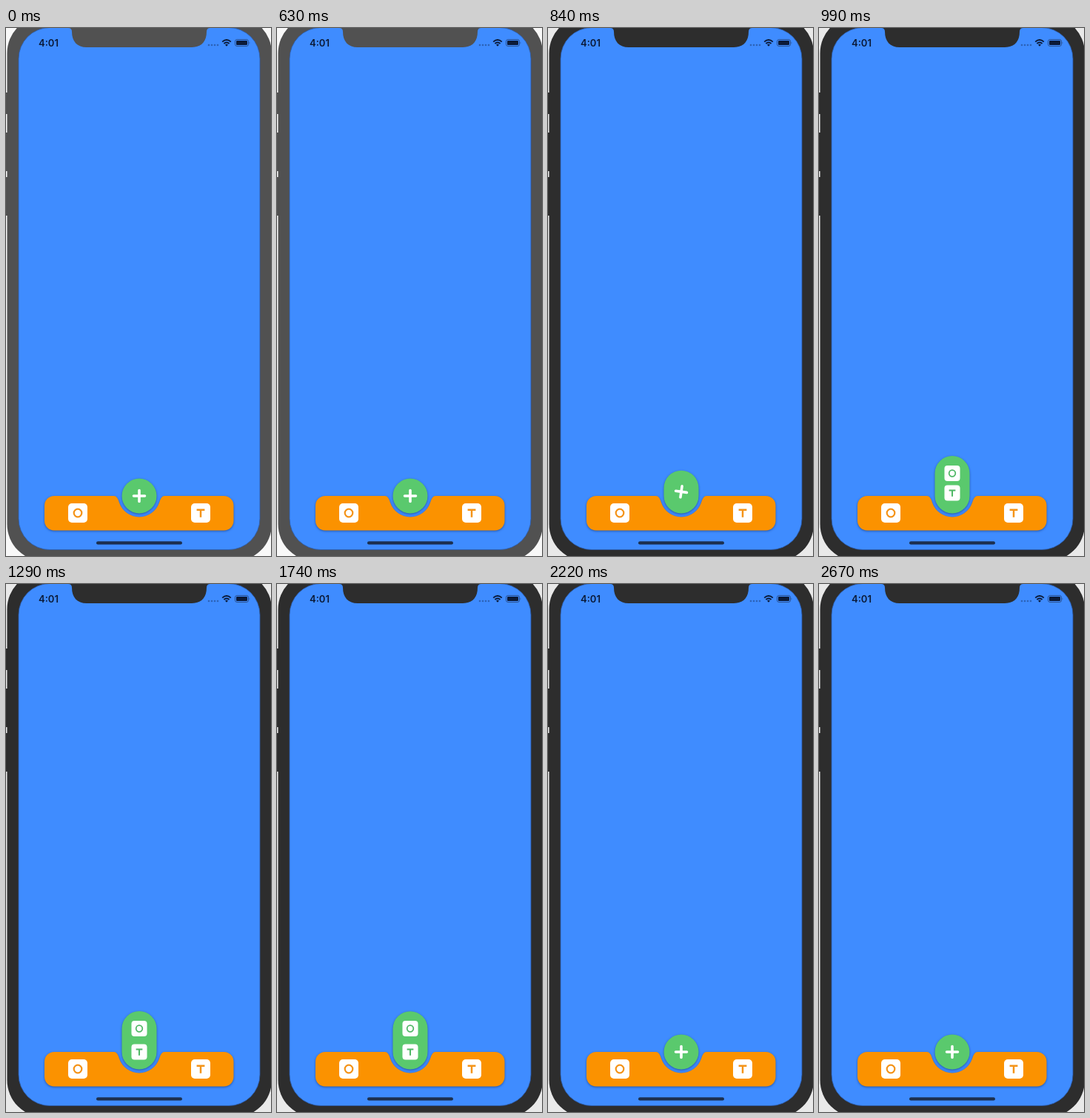
Write an HTML page that moves like this. It is 358 px wide and 712 px high and loops after 2700 ms.

```html
<!DOCTYPE html>
<html lang="en">
<head>
<meta charset="utf-8">
<title>Expanding tab bar button</title>
<style>
  html, body { margin: 0; height: 100%; overflow: hidden; }
  svg { display: block; width: 358px; height: 712px; }
  .shadow { filter: drop-shadow(0 1px 1.5px rgba(10, 30, 80, .5)); }
  text { font: 600 13px Inter, Roboto, sans-serif; }
</style>
</head>
<body>
<svg viewBox="0 0 358 712">
  <defs>
    <g id="ring">
      <rect x="-13" y="-13" width="26" height="26" rx="5" fill="#fff"/>
      <circle r="5.3" fill="none" stroke="currentColor" stroke-width="2.2"/>
    </g>
    <g id="tee">
      <rect x="-13" y="-13" width="26" height="26" rx="5" fill="#fff"/>
      <path d="M-5.4-4.2H5.4M0-4.2V5.8" fill="none" stroke="currentColor" stroke-width="2.5"/>
    </g>
  </defs>

  <rect id="desk" width="358" height="712"/>
  <g id="body">
    <path d="M0 87h3v29H0zM0 141h3v52H0zM0 201h3v52H0z"/>
    <rect x="1.5" y="-16" width="357.5" height="735" rx="50"/>
  </g>
  <rect x="17" y="-.5" width="326" height="704" rx="42" fill="#3f8cff" stroke="#2b5cae" stroke-width=".8"/>
  <path id="notch" d="M84-2V0Q89 0 89 5C89 18 96 26 109 26H251C264 26 271 18 271 5Q271 0 276 0V-2Z"/>

  <g fill="#0b1a38">
    <text x="44" y="24.6">4:01</text>
    <g fill="#2c63b8">
      <circle cx="274" cy="23" r="1.3"/><circle cx="278" cy="23" r="1.3"/>
      <circle cx="282" cy="23" r="1.3"/><circle cx="286" cy="23" r="1.3"/>
    </g>
    <g fill="none" stroke="#0b1a38" stroke-width="1.9">
      <path d="M292.2 18.6Q298 13.4 303.8 18.6M294.4 21Q298 17.8 301.6 21"/>
    </g>
    <path d="M296 22.6Q298 20.9 300 22.6L298 24.8Z"/>
    <rect x="309.5" y="15.5" width="18" height="9" rx="2.6" fill="none" stroke="#2b5191"/>
    <rect x="311" y="17" width="15" height="6" rx="1.3"/>
    <path d="M328.6 18.3q1.5 1.7 0 3.4z" fill="#2b5191"/>
  </g>

  <path class="shadow" fill="#fb9200" d="M65 631H146Q150.500 631 153 640A28.500 28.500 0 0 0 207 640Q209.500 631 214 631H294.500A13 13 0 0 1 307.500 644V664.500A13 13 0 0 1 294.500 677.500H65A13 13 0 0 1 52 664.500V644A13 13 0 0 1 65 631Z"/>
  <g color="#f49318">
    <use href="#ring" x="97" y="654"/>
    <use href="#tee" x="263" y="654"/>
  </g>

  <rect id="pill" class="shadow" x="156.500" width="47" rx="23.500" fill="#5ac96d"/>
  <g color="#4fb865">
    <use id="upper" href="#ring"/>
    <use id="lower" href="#tee"/>
  </g>
  <path id="plus" d="M-7.500 0H7.500M0-7.500V7.500" stroke-width="3.600" stroke-linecap="round"/>
  <rect x="122" y="692.300" width="116" height="4.200" rx="2.100" fill="#1c2f4e"/>
</svg>

<script>
const LOOP = 2700, MOVE = 300, PRESS = 650, OPEN = 723, CLOSE = 1727, LAG = 36;
const el = id => document.getElementById(id);
const set = (id, attrs) => {
  for (const name in attrs) el(id).setAttribute(name, attrs[name]);
};
const clamp = x => Math.min(1, Math.max(0, x));
const ease = x => (x = clamp(x), x * x * (3 - 2 * x));
const openness = t => ease((t - OPEN) / MOVE) - ease((t - CLOSE) / MOVE);

function draw(t) {
  const focused = t >= PRESS;
  const shell = focused ? '#2d2d2d' : '#515151';
  set('desk', { fill: focused ? '#e9e9e9' : '#f8f8f8' });
  set('body', { fill: shell });
  set('notch', { fill: shell });

  const grow = 31.5 * openness(t);
  set('pill', { y: 607.5 - grow, height: 47 + grow });

  // The contents trail the pill slightly.
  const k = openness(t - LAG);
  const iconOpacity = clamp((k - .35) / .5);
  const place = y => `translate(180 ${y}) scale(.81)`;
  set('upper', { transform: place(607 - 7.5 * k), opacity: iconOpacity });
  set('lower', { transform: place(600 + 31 * k), opacity: iconOpacity });
  set('plus', {
    transform: `translate(180 ${631 - 31 * k}) rotate(${45 * k})`,
    opacity: clamp(1 - (k - .3) / .35),
    stroke: focused && t < OPEN + 20 ? '#8fa294' : '#fff'
  });
}

function frame() {
  draw(performance.now() % LOOP);
  requestAnimationFrame(frame);
}
frame();
</script>
</body>
</html>
```
